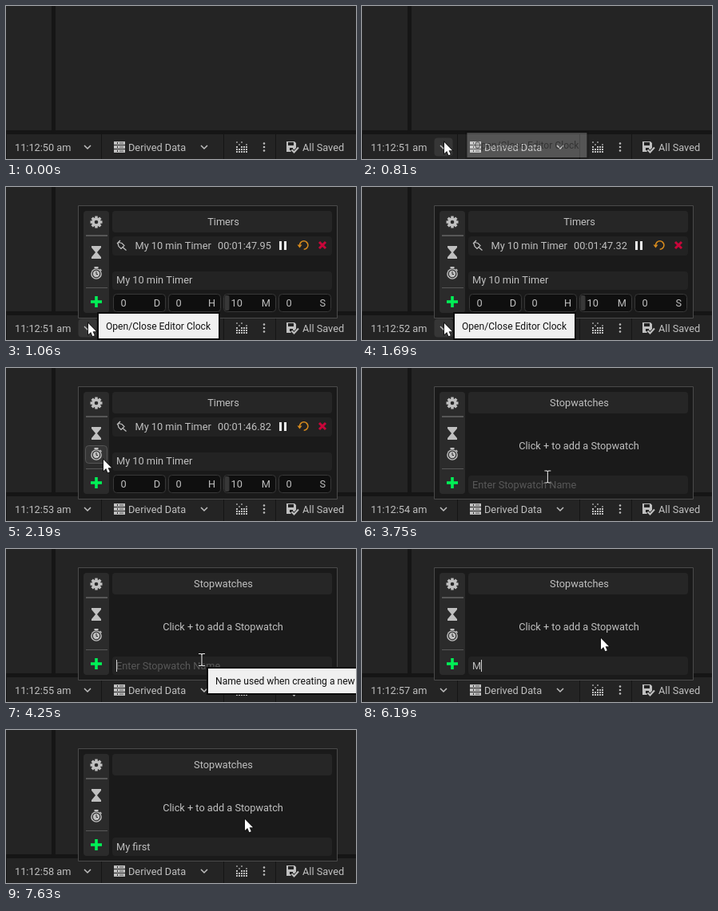
An HTML page with a canvas for the animation above (8 s loop, 438 by 192 pixels).

```html
<!DOCTYPE html>
<html lang="en">
<head>
<meta charset="utf-8">
<title>Editor clock</title>
<style>
html, body { margin: 0; width: 100%; height: 100%; overflow: hidden; background: #242424; }
canvas { display: block; }
</style>
</head>
<body>
<canvas id="stage" width="438" height="192"></canvas>
<script>
const ctx = document.getElementById('stage').getContext('2d');
const LOOP = 8000;
const FONT = '12.75px Roboto, sans-serif';
const TIP_FONT = '12.1px Roboto, sans-serif';
const LIGHT = '#c0c0c0', DARK = '#151515', FIELD = '#232323', BACK = '#242424';

const OPEN = 940, SWITCH = 2380, FOCUS = 4130;
const TYPED = 'My first ';
const KEYS = [6030, 6380, 6560, 6750, 6940, 7030, 7130, 7250, 7380];
const TIPS = [
  { text: 'Open/Close Editor Clock', x: 116, y: 159, from: 738, to: 1780 },
  { text: 'Show Stopwatches', x: 135, y: 124, from: 2200, to: 3220 },
  { text: 'Name used when creating a new Stopwatch', x: 253, y: 150, from: 4100, to: 4310 }
];

const clamp = v => Math.max(0, Math.min(1, v));
const ease = v => v * v * (3 - 2 * v);
const between = (t, a, b) => t >= a && t < b;

function rect(x, y, w, h, color) {
  ctx.fillStyle = color;
  ctx.fillRect(x, y, w, h);
}

function box(x, y, w, h, fill, stroke, radius = 4) {
  ctx.beginPath();
  ctx.roundRect(x, y, w, h, radius);
  ctx.fillStyle = fill;
  ctx.fill();
  if (stroke) {
    ctx.strokeStyle = stroke;
    ctx.lineWidth = 1;
    ctx.stroke();
  }
}

function text(str, x, y, color = LIGHT, align = 'left', font = FONT) {
  ctx.font = font;
  ctx.textAlign = align;
  ctx.fillStyle = color;
  ctx.fillText(str, x, y);
}

function line(path, color = LIGHT, width = 1.5) {
  ctx.strokeStyle = color;
  ctx.lineWidth = width;
  ctx.stroke(new Path2D(path));
}

function shape(path, color = LIGHT) {
  ctx.fillStyle = color;
  ctx.fill(new Path2D(path), 'evenodd');
}

function disc(x, y, r, color = LIGHT) {
  ctx.beginPath();
  ctx.arc(x, y, r, 0, Math.PI * 2);
  ctx.fillStyle = color;
  ctx.fill();
}

function pointer(t) {
  const move = (t0, t1, a, b) => {
    const p = ease(clamp((t - t0) / (t1 - t0)));
    return { x: a[0] + (b[0] - a[0]) * p, y: a[1] + (b[1] - a[1]) * p };
  };
  const clock = [103, 171], watch = [122, 115], field = [245, 139], rest = [299, 112];
  if (t < 60) return { x: 396, y: 220 };
  if (t < 1750) {
    const p = ease(clamp((t - 20) / 620)), q = 1 - p;
    return {
      x: q * q * 396 + 2 * q * p * 250 + p * p * clock[0],
      y: q * q * 200 + 2 * q * p * 70 + p * p * clock[1]
    };
  }
  if (t < 3150) return move(1750, 2150, clock, watch);
  if (t < 4260) return move(3150, 3900, watch, field);
  return move(4260, 4430, field, rest);
}

function hoverBox(mouse, x, y, w, h, stroke) {
  if (between(mouse.x, x, x + w) && between(mouse.y, y, y + h)) {
    box(x + .5, y + .5, w - 1, h - 1, '#363636', stroke);
  }
}

const chevron = x => line(`M${x - 4} 175l4 4 4-4`);

function drawStatusBar(t, mouse) {
  rect(0, 0, 438, 192, BACK);
  rect(57, 0, 5, 157, DARK);
  rect(0, 156, 438, 5, DARK);
  for (const x of [0, 119, 272, 337]) rect(x, 161, 1, 31, DARK);

  text(`11:12:${50 + Math.floor((t + 870) / 1000)} am`, 11, 182);
  hoverBox(mouse, 90, 165, 24, 24);
  chevron(102);

  for (let i = 0; i < 3; i++) {
    const y = 170 + i * 5;
    rect(135, y, 14, 4, LIGHT);
    rect(139, y + 1, 1, 2, BACK);
    rect(142, y + 1.5, 5, 1, '#555');
  }
  text('Derived Data', 153, 182);
  chevron(248);

  const rows = ['x.x..', '.x..x', 'x.xxx', 'xxxxx', 'xxxxx'];
  rows.forEach((row, j) => [...row].forEach((c, i) => {
    if (c === 'x') rect(288 + i * 3, 170 + j * 3, 2, 2, j < 2 ? '#808080' : LIGHT);
  }));
  for (const y of [172.5, 177, 181.5]) disc(323, y, 1.3);

  shape('M351 170h10l2 2v11h-12z M353 171v4h7v-4z M355 178v3h4v-3z');
  const check = 'M357.5 180.5l3 3 5.5-6';
  line(check, BACK, 4);
  line(check, LIGHT, 2);
  text('All Saved', 371, 182);
}

function drawToolbar(mouse) {
  box(97, 30, 32, 128, '#2b2b2b');
  for (const y of [32, 71, 97, 133]) hoverBox(mouse, 99, y, 28, 23, '#555');
  rect(100, 60, 27, 2, '#585858');
  rect(100, 126, 27, 1, '#585858');

  ctx.save();
  ctx.translate(113, 44);
  for (let i = 0; i < 8; i++) {
    rect(-1.7, -7.5, 3.4, 4, LIGHT);
    ctx.rotate(Math.PI / 4);
  }
  ctx.restore();
  disc(113, 44, 5.7);
  disc(113, 44, 2.3, '#2b2b2b');

  shape('M107 74h12v2l-5 6 5 6v2h-12v-2l5-6-5-6z');

  disc(113, 109, 6.8);
  disc(113, 109, 5.4, '#2b2b2b');
  disc(113, 109, 4.2);
  rect(110.5, 100, 5, 2, LIGHT);
  line('M117.5 103l2 2');
  line('M113 106v3.5h2', '#2b2b2b', 1);

  rect(106, 142.2, 14, 3.6, '#00f056');
  rect(111.2, 137, 3.6, 14, '#00f056');
}

function drawTimers(t) {
  const left = 107.32 - (t - 1690) / 1000;
  const seconds = (left % 60).toFixed(2).padStart(5, '0');

  text('Timers', 272, 48, LIGHT, 'center');
  box(133, 62, 275, 24, '#222');
  line('M139 71l4-4 M141 69.5l4 1 3 3-4 4-3-3-1-4 M146 75.5l4.5 4', LIGHT, 1.2);
  text('My 10 min Timer', 161.5, 78);
  text(`00:0${Math.floor(left / 60)}:${seconds}`, 265, 78);
  rect(342, 68, 3, 11, '#eee');
  rect(348, 68, 3, 11, '#eee');
  line('M367.5 73a5.2 5.2 0 1 1 5.2 5.2', '#d58a1e', 1.6);
  shape('M364.5 72.5h6l-3 4z', '#d58a1e');
  line('M392 69l8 8 M400 69l-8 8', '#c8063a', 3);

  box(133, 106, 275, 23, FIELD);
  text('My 10 min Timer', 138, 121);
  [['0', 'D'], ['0', 'H'], ['10', 'M'], ['0', 'S']].forEach(([value, unit], i) => {
    const x = 134.5 + i * 69;
    box(x, 134.5, 65, 22, '#0f0f0f', '#383838');
    if (value === '10') box(x + 1, 136, 6, 19, '#383838', null, 2);
    text(value, x + 9, 150);
    text(unit, x + 58.5, 150, LIGHT, 'right');
  });
}

function drawStopwatches(t) {
  text('Stopwatches', 272, 48, LIGHT, 'center');
  text('Click + to add a Stopwatch', 271.5, 102, LIGHT, 'center');
  box(133, 135, 275, 23, FIELD);

  const typed = TYPED.slice(0, KEYS.filter(k => t >= k).length);
  if (typed) text(typed, 138, 151);
  else text('Enter Stopwatch Name', 138, 151, '#585858');

  const caretOn = between(t, FOCUS, 4810) || between(t, 5310, 5810) || between(t, KEYS[0], 7630);
  if (caretOn) {
    ctx.font = FONT;
    rect(Math.round(138 + ctx.measureText(typed).width), 139, 1, 15, '#d0d0d0');
  }
}

function drawPanel(t, mouse) {
  box(90.5, 23.5, 324, 141, '#1a1a1a', '#4a4a4a', 0);
  drawToolbar(mouse);
  box(133, 30, 275, 27, '#262626');
  if (t < SWITCH) drawTimers(t);
  else drawStopwatches(t);
}

function drawPointer(mouse, t) {
  const { x, y } = mouse;
  const inField = t > SWITCH && x > 133 && y > 135;
  ctx.save();
  ctx.translate(x, y);
  if (inField) {
    const beam = 'M-4-7.5h3l1 1 1-1h3 M0-6.5v13 M-4 7.5h3l1-1 1 1h3';
    line(beam, '#111', 2.6);
    line(beam, '#eee', 1.1);
  } else {
    const arrow = 'M0 0v14l3.2-3 2.2 5.3 2.4-1-2.2-5.1h4.4z';
    line(arrow, '#111', 1.6);
    shape(arrow, '#fff');
  }
  ctx.restore();
}

// Tooltips slide in from the right; the background fades in later than the text.
function drawTip({ text: label, x, y, from, to }, t) {
  if (!between(t, from, to)) return;
  const p = clamp((t - from) / 150);
  ctx.save();
  ctx.translate(30 * (1 - p), 0);
  ctx.font = TIP_FONT;
  const width = Math.round(ctx.measureText(label).width) + 19;
  ctx.globalAlpha = p * p;
  ctx.strokeStyle = '#0c0c0c';
  ctx.lineWidth = 2;
  ctx.strokeRect(x - 1, y - 1, width + 2, 33);
  rect(x, y, width, 31, '#f0f0f0');
  ctx.globalAlpha = p;
  text(label, x + 9, y + 20, '#111', 'left', TIP_FONT);
  ctx.restore();
}

function draw(t) {
  const mouse = pointer(t);
  drawStatusBar(t, mouse);
  if (t >= OPEN) drawPanel(t, mouse);
  drawPointer(mouse, t);
  TIPS.forEach(tip => drawTip(tip, t));
}

const start = performance.now();
function tick() {
  draw((performance.now() - start) % LOOP);
  requestAnimationFrame(tick);
}
tick();
</script>
</body>
</html>
```
